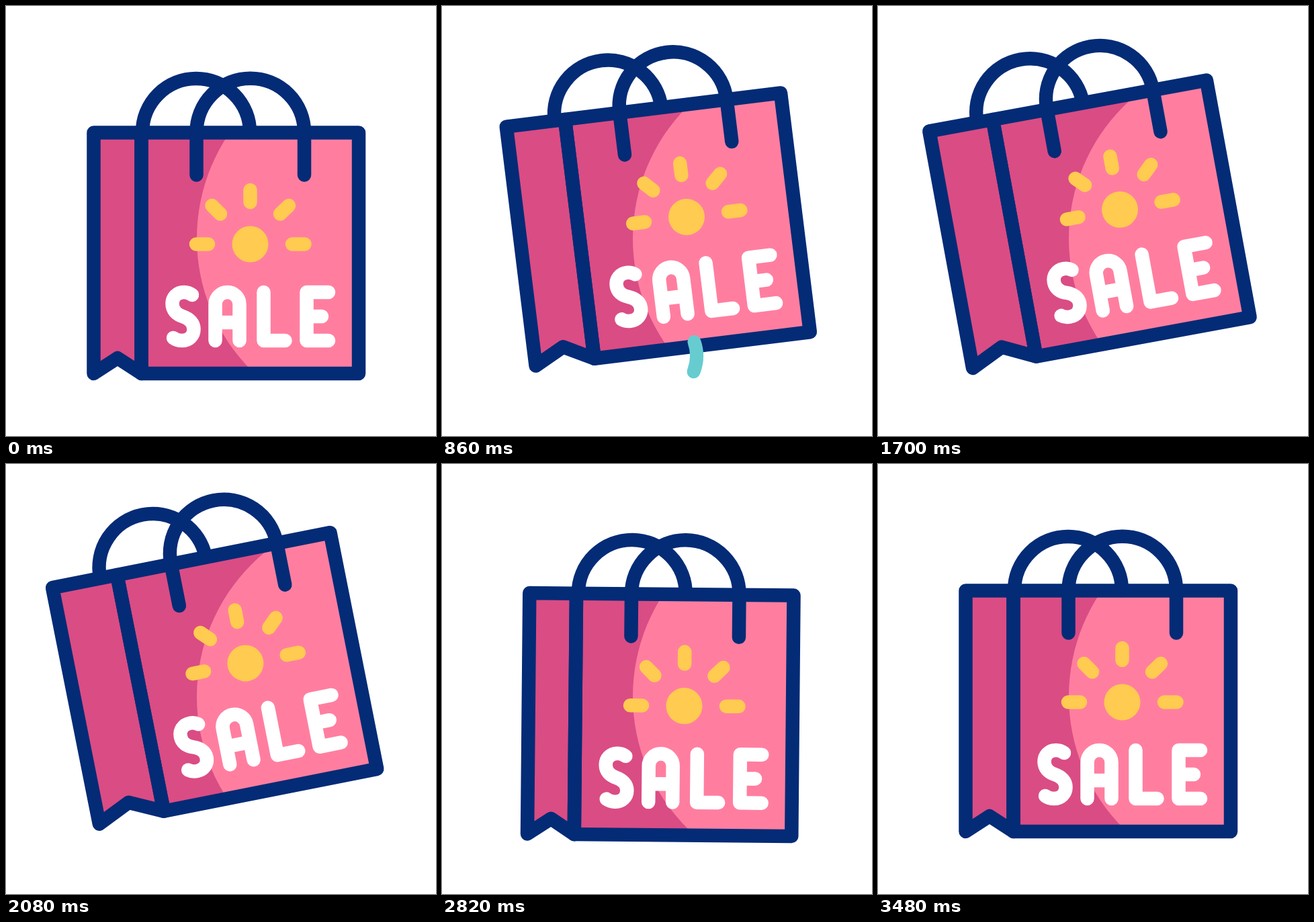
An HTML page with a canvas for the animation above (3600 ms loop, 640 by 640 pixels).

```html
<!DOCTYPE html>
<html lang="en">
<head>
<meta charset="utf-8">
<title>Sale bag</title>
<style>
  html, body { margin: 0; width: 100%; height: 100%; overflow: hidden; background: #fff; }
  canvas { display: block; width: 640px; height: 640px; }
</style>
</head>
<body>
<canvas id="stage" width="640" height="640" role="img" aria-label="SALE"></canvas>
<script>
const ctx = document.getElementById('stage').getContext('2d');
const LOOP = 3600;
const NAVY = '#042b76', DARK = '#da4c84', LIGHT = '#ff7ea0', GOLD = '#ffcb50', TEAL = '#67ccd0';
const PIVOT = [363.5, 354.5];

// time, x and y of the sun, tilt in degrees
const KEYS = [
  [120, 363.5, 354.5, 0],
  [380, 361.3, 367, 2.8],
  [640, 353.3, 384.7, 6.2],
  [700, 353, 387.4, 6.4],
  [860, 364, 314, -7],
  [900, 363.8, 312, -7.4],
  [1180, 361.5, 307.5, -8.7],
  [1700, 360, 303, -10.4],
  [2290, 353, 294.5, -11.4],
  [2420, 348.2, 298.5, -10.05],
  [2820, 360.5, 360, 0.5],
  [3015, 360.5, 373.7, 3.4],
  [3480, 363.5, 354.5, 0]
];

const slope = (i, c) => (KEYS[i + 1][c] - KEYS[i][c]) / (KEYS[i + 1][0] - KEYS[i][0]);

// Monotone tangent: flat at the ends and at every turning point
function tangent(i, c) {
  if (i === 0 || i === KEYS.length - 1) return 0;
  const a = slope(i - 1, c), b = slope(i, c);
  return a * b > 0 ? 2 * a * b / (a + b) : 0;
}

function sample(t, c) {
  const last = KEYS.length - 1;
  if (t <= KEYS[0][0]) return KEYS[0][c];
  if (t >= KEYS[last][0]) return KEYS[last][c];
  let i = 0;
  while (t > KEYS[i + 1][0]) i++;
  const h = KEYS[i + 1][0] - KEYS[i][0], u = (t - KEYS[i][0]) / h, v = 1 - u;
  return KEYS[i][c] * v * v * (1 + 2 * u) + KEYS[i + 1][c] * u * u * (3 - 2 * u)
    + h * u * v * (tangent(i, c) * v - tangent(i + 1, c) * u);
}

const rays = new Path2D(
  'M363.5 274V292M283 354.5H301M426 354.5H444.5M306.5 297L319 309.5M421 297L408 309.5');
const letters = new Path2D(
  'M277 430C273 427 269 426 265 426C254 426 247.5 434 247.5 443C247.5 453 254 459 263 462' +
  'C273 465.5 279.5 472 279.5 481C279.5 491 272 498 262 498C257 498 253 497 249 494' +
  'M311.5 498V444A18 18 0 0 1 347.5 444V498M311.5 471H347.5' +
  'M383.5 426V498H415.5' +
  'M480 426H447.5V498H480M447.5 462H470');
const frontHandle = new Path2D('M283.5 251.5V188A80.25 80.25 0 0 1 444 188V251.5');
const frontFace = new Path2D('M201.5 188.5H525V547H201.5Z');
const trail = new Path2D('M375.5 500Q383 521 375 543Q367 565 375 586');
const TRAIL_LEN = 89;

function line(path, color, width) {
  ctx.strokeStyle = color;
  ctx.lineWidth = width;
  ctx.stroke(path);
}

function drawBag(x, y, tilt) {
  const side = 71 - 2.4 * tilt;
  const left = 201.5 - side;
  const shift = left - 130.5;
  const sidePanel = new Path2D(
    `M201.5 188.5H${left}V547L${left + side / 2} 524L201.5 547Z`);
  const rearHandle = new Path2D(
    `M${203 + shift} 188A80 80 0 0 1 ${363 + shift} 188`);

  ctx.save();
  ctx.translate(x, y);
  ctx.rotate(tilt * Math.PI / 180);
  ctx.translate(-PIVOT[0], -PIVOT[1]);

  ctx.fillStyle = DARK;
  ctx.fill(sidePanel);
  ctx.fill(frontFace);

  // The highlight stays still on the stage while the bag moves over it
  ctx.save();
  ctx.clip(frontFace);
  ctx.setTransform(1, 0, 0, 1, 0, 0);
  ctx.fillStyle = LIGHT;
  ctx.beginPath();
  ctx.arc(562, 346, 278, 0, 2 * Math.PI);
  ctx.fill();
  ctx.restore();

  for (const part of [rearHandle, sidePanel, frontFace, frontHandle]) line(part, NAVY, 20.5);

  ctx.fillStyle = GOLD;
  ctx.beginPath();
  ctx.arc(PIVOT[0], PIVOT[1], 27, 0, 2 * Math.PI);
  ctx.fill();
  line(rays, GOLD, 20.5);
  line(letters, '#fff', 20.5);
  ctx.restore();
}

const ramp = (t, a, b) => {
  const u = Math.min(1, Math.max(0, (t - a) / (b - a)));
  return u * u * (3 - 2 * u);
};

function drawTrail(t) {
  const from = ramp(t, 1040, 1300) * TRAIL_LEN;
  const to = ramp(t, 760, 960) * TRAIL_LEN;
  if (to - from < 0.1) return;
  ctx.setLineDash([to - from, 2 * TRAIL_LEN]);
  ctx.lineDashOffset = -from;
  line(trail, TEAL, 20);
  ctx.setLineDash([]);
}

function draw(t) {
  ctx.fillStyle = '#fff';
  ctx.fillRect(0, 0, 640, 640);
  drawBag(sample(t, 1), sample(t, 2), sample(t, 3));
  drawTrail(t);
}

ctx.lineCap = ctx.lineJoin = 'round';
const start = performance.now();
function tick() {
  draw((performance.now() - start) % LOOP);
  requestAnimationFrame(tick);
}
tick();
</script>
</body>
</html>
```
